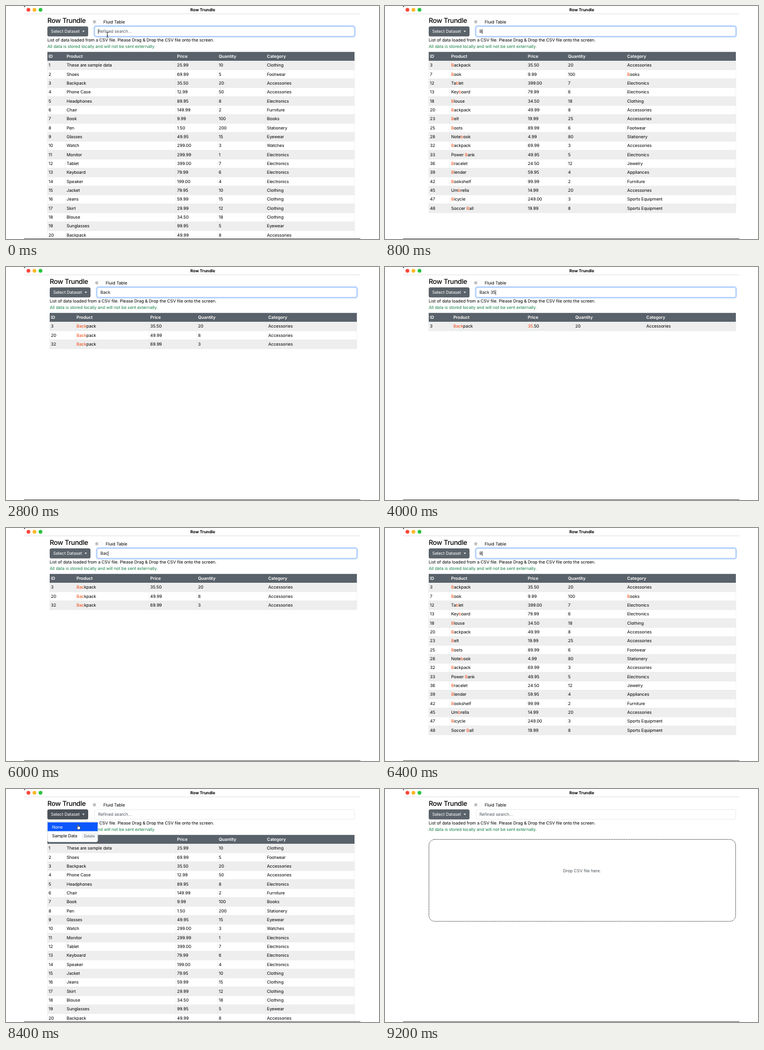
Animation, 640 px wide and 400 px high, one loop 9.6 s. Source, as an HTML page:

```html
<!DOCTYPE html>
<html lang="en">
<head>
<meta charset="utf-8">
<title>Row Trundle</title>
<style>
  html, body { margin: 0; width: 100%; height: 100%; overflow: hidden; background: #fff; }
  svg { display: block; width: 640px; height: 400px; }
  text {
    font: 7.4px Inter, "Liberation Sans", sans-serif;
    letter-spacing: -0.09px;
    white-space: pre;
    text-rendering: geometricPrecision;
  }
  .title { font-size: 7px; font-weight: 700; letter-spacing: 0; }
  .head { font-size: 11.6px; font-weight: 500; letter-spacing: -0.3px; }
  .th { font-weight: 600; fill: #fff; }
  .light { fill: #fff; }
  .small { font-size: 6.3px; fill: #555c63; }
  .hit { fill: #ee4510; }
</style>
</head>
<body>
<svg id="stage" viewBox="0 0 640 400">
  <rect width="640" height="400" fill="#fff"/>
  <path d="M31 13.5H608" stroke="#e2e2e2"/>
  <path d="M31 0h2.5l-1.6 1l-.9 2z" fill="#222"/>
  <circle cx="38.5" cy="6.5" r="3.2" fill="#ff4539"/>
  <circle cx="48.8" cy="6.5" r="3.2" fill="#fdb827"/>
  <circle cx="59.2" cy="6.5" r="3.2" fill="#29c33f"/>
  <text class="title" x="337.6" y="9" text-anchor="middle">Row Trundle</text>

  <g id="page">
    <text class="head" x="71" y="28.6">Row Trundle</text>
    <rect x="148.5" y="23.7" width="14" height="6.8" rx="3.4" fill="#fff" stroke="#ededed" stroke-width=".6"/>
    <circle cx="151.8" cy="27.1" r="2.6" fill="#bcbcbc"/>
    <text x="167" y="29.7">Fluid Table</text>
    <rect id="button" x="71" y="35" width="70" height="17.2" rx="2.8"/>
    <text class="light" x="77" y="46.2">Select Dataset</text>
    <path d="M130.8 42.5h4.2l-2.1 2.2z" fill="#fff"/>
    <rect id="glow" x="151.2" y="34.2" width="447.6" height="18.8" rx="3.6" fill="none" stroke="#c3dafe" stroke-width="2.2"/>
    <rect id="field" x="152.2" y="35.2" width="445.6" height="16.8" rx="2.8" fill="#fff" stroke-width=".8"/>
    <text id="query" x="158" y="46.2"></text>
    <path id="caret" stroke="#111" stroke-width=".7"/>
    <text x="71" y="60.8">List of data loaded from a CSV file. Please Drag &amp; Drop the CSV file onto the screen.</text>
    <text x="71" y="72" fill="#198048">All data is stored locally and will not be sent externally.</text>
    <g id="table"></g>
    <g id="drop">
      <rect x="71.4" y="86.6" width="526.2" height="140.6" rx="10" fill="none" stroke="#333" stroke-width=".9" stroke-dasharray="1.9 1"/>
      <text x="334" y="142.6" text-anchor="middle" fill="#50565c">Drop CSV file here.</text>
    </g>
    <g id="menu">
      <rect x="71.2" y="55.7" width="86.2" height="35.2" rx="2.8" fill="#fff" stroke="#cfcfcf" stroke-width=".6"/>
      <rect id="hover" x="71.4" y="57.2" width="85.8" height="15.2" fill="#0b57fd"/>
      <text id="none" x="79" y="67.5">None</text>
      <text x="79" y="82.6">Sample Data</text>
      <rect x="130" y="74" width="27" height="12.4" rx="2" fill="#f3f4f5"/>
      <text class="small" x="133.8" y="82.6">Delete</text>
    </g>
  </g>

  <path d="M31 399.5H608" stroke="#666"/>
  <path id="beam" d="M-1.8 -4.2q1.8 0 1.8 1.2V3q0 1.2 -1.8 1.2M1.8 -4.2Q0 -4.2 0 -3M0 3q0 1.2 1.8 1.2M-1 1H1" fill="none" stroke="#111" stroke-width=".8"/>
  <path id="hand" d="M-1 -4q.8 -.8 1.4 .2v2.4l2.5 .6q1 .3 .8 1.4l-.5 2.2l-.7 1.4h-3.2l-2.3 -3.2q-.2 -1 .8 -.8l1 .8z" fill="#fff" stroke="#111" stroke-width=".7"/>
  <path id="arrow" d="M0 0V7.4L1.7 5.9L2.8 8.4L4 7.9L2.9 5.4H5.2z" fill="#111" stroke="#fff" stroke-width=".6"/>
</svg>
<script>
const STEP = 400, LOOP = 9600, LEFT = 71, RIGHT = 598, TOP = 94.2, ROW = 15.34;
const $ = id => document.getElementById(id);
const heads = ["ID", "Product", "Price", "Quantity", "Category"];

const first = `These are sample data,25.99,10,Clothing
Shoes,69.99,5,Footwear
Backpack,35.50,20,Accessories
Phone Case,12.99,50,Accessories
Headphones,89.95,8,Electronics
Chair,149.99,2,Furniture
Book,9.99,100,Books
Pen,1.50,200,Stationery
Glasses,49.95,15,Eyewear
Watch,299.00,3,Watches
Monitor,299.99,1,Electronics
Tablet,399.00,7,Electronics
Keyboard,79.99,6,Electronics
Speaker,199.00,4,Electronics
Jacket,79.95,10,Clothing
Jeans,59.99,15,Clothing
Skirt,29.99,12,Clothing
Blouse,34.50,18,Clothing
Sunglasses,99.95,5,Eyewear
Backpack,49.99,8,Accessories`.split("\n").map((line, i) => i + 1 + "," + line);

const later = `23,Belt,19.99,25,Accessories
25,Boots,89.99,6,Footwear
28,Notebook,4.99,80,Stationery
32,Backpack,69.99,3,Accessories
33,Power Bank,49.95,5,Electronics
36,Bracelet,24.50,12,Jewelry
39,Blender,59.95,4,Appliances
42,Bookshelf,99.99,2,Furniture
45,Umbrella,14.99,20,Accessories
47,Bicycle,249.00,3,Sports Equipment
48,Soccer Ball,19.99,8,Sports Equipment`.split("\n");

const rows = [...first, ...later].map(line => line.split(","));

// left edge of each column's text, by search text
const columns = {
  "": [73, 104, 293.5, 365, 447.8],
  "B": [73, 109.5, 241, 310, 411.5],
  "Ba": [73, 111.5, 239, 309, 411.3],
  "Back 35": [73, 113.2, 241, 322.5, 444.3],
  other: [73, 117, 243.6, 325.5, 446]
};

const typed = [[0, ""], [800, "B"], [1600, "Ba"], [2000, "Bac"], [2400, "Back"], [2800, "Back "],
  [3600, "Back 3"], [4000, "Back 35"], [5200, "Back 3"], [5600, "Back"], [6000, "Bac"],
  [6400, "B"], [6800, ""]];
const caretOff = [400, 1200, 1600, 2800, 4400, 6800];

const show = (id, on) => $(id).setAttribute("display", on ? "inline" : "none");
const put = (id, x, y) => $(id).setAttribute("transform", `translate(${x} ${y})`);
const escape = s => s.replace(/&/g, "&amp;");
const label = (x, y, body, cls = "") => `<text x="${x}" y="${y}" class="${cls}">${body}</text>`;

function mark(cell, words) {
  if (!words.length) return escape(cell);
  const pattern = new RegExp("(" + words.join("|") + ")", "gi");
  return cell.replace(pattern, '<tspan class="hit">$1</tspan>');
}

function tableFor(search) {
  const words = search.split(" ").filter(Boolean);
  const xs = columns[search] || columns.other;
  const has = (row, word) => row.some(cell => cell.toLowerCase().includes(word.toLowerCase()));
  const found = rows.filter(row => words.every(word => has(row, word))).slice(0, 20);
  const bottom = TOP + found.length * ROW;
  let out = `<rect x="${LEFT}" y="78.8" width="${RIGHT - LEFT}" height="15.4" fill="#59626a"/>`;
  let lines = "";
  heads.forEach((h, i) => { out += label(xs[i], 89.2, h, "th"); });
  found.forEach((row, r) => {
    const y = TOP + r * ROW;
    if (r % 2 === 0) out += `<rect x="${LEFT}" y="${y}" width="${RIGHT - LEFT}" height="${ROW}" fill="#eeeeee"/>`;
    lines += `M${LEFT} ${y + ROW}H${RIGHT}`;
    row.forEach((cell, i) => { out += label(xs[i], (y + 10.1).toFixed(2), mark(cell, words)); });
  });
  for (const x of [...xs.map(x => x - 2), RIGHT]) lines += `M${x} ${TOP}V${bottom}`;
  return out + `<path d="${lines}" stroke="#e1e4e7" stroke-width=".5"/>`;
}

let last = -1;
function draw(time) {
  const t = Math.floor(time % LOOP / STEP) * STEP;
  if (t === last) return;
  last = t;
  const search = typed.filter(([from]) => from <= t).pop()[1];
  const focus = t < 7600, empty = t >= 8800, open = !focus && !empty;
  const hover = open && t >= 8000;

  put("page", search || empty ? 4 : 0, 0);
  $("button").setAttribute("fill", open ? "#4b5259" : "#5b636b");
  show("glow", focus);
  $("field").setAttribute("stroke", focus ? "#8fbcfd" : "#e3e6e9");
  $("query").textContent = search || "Refined search...";
  $("query").setAttribute("fill", search ? "#111" : "#50575e");
  const end = 158 + (search ? $("query").getComputedTextLength() : 0) + .3;
  $("caret").setAttribute("d", `M${end} 39.6V48.2`);
  show("caret", focus && !caretOff.includes(t));

  show("table", !empty);
  if (!empty) $("table").innerHTML = tableFor(search);
  show("drop", empty);
  show("menu", open);
  show("hover", hover);
  $("none").setAttribute("fill", hover ? "#fff" : "#111");

  show("beam", t < 800);
  put("beam", 174, 49.5);
  show("hand", t >= 7200 && !empty);
  put("hand", t < 8000 ? 112 : 124, t < 8000 ? 46 : 65.5);
  show("arrow", t === 8800);
  put("arrow", 123, 62);
}

const start = performance.now();
function tick() {
  draw(performance.now() - start);
  requestAnimationFrame(tick);
}
tick();
</script>
</body>
</html>
```
